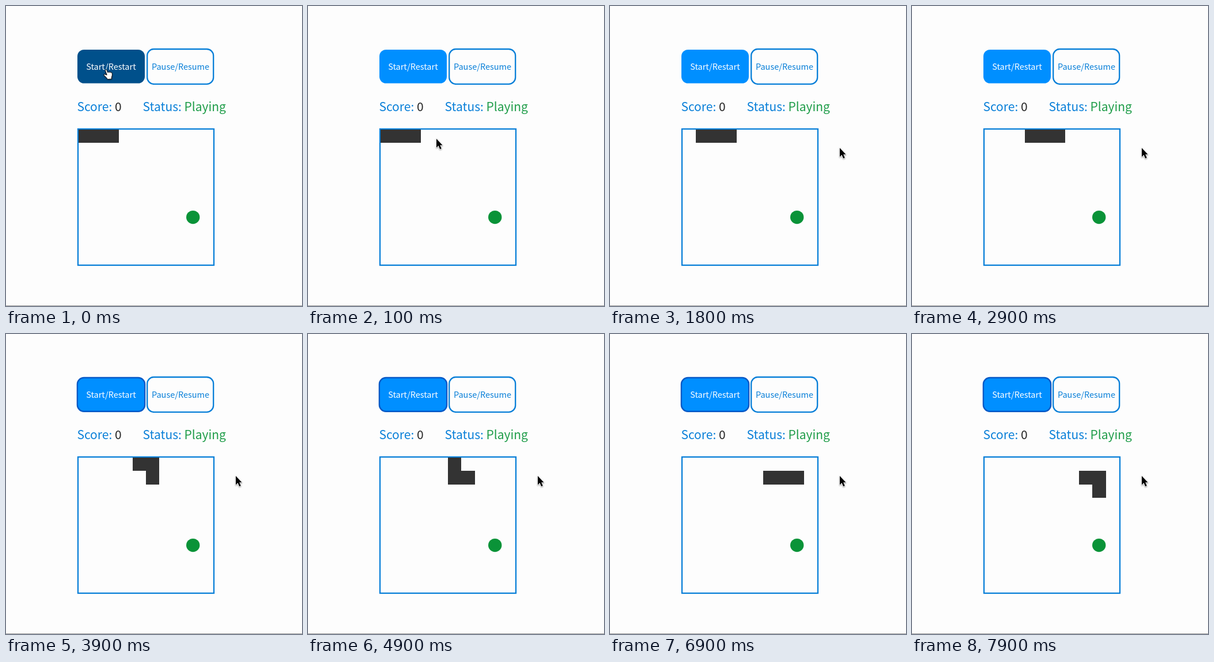
These frames come from a looping animation (514x522 px, 8000 ms). An HTML page:

```html
<!DOCTYPE html>
<html lang="en">
<head>
<meta charset="utf-8">
<title>Snake</title>
<style>
  html, body { margin: 0; width: 100%; height: 100%; overflow: hidden; background: #fdfdfd; }
  svg { display: block; width: 514px; height: 522px; }
  text {
    font-family: "Noto Sans CJK JP", "Noto Sans CJK SC", "Noto Sans CJK", "Open Sans", sans-serif;
    font-size: 21px;
    fill: #087fd8;
  }
  .label { font-size: 14.5px; text-anchor: middle; }
  .frame { fill: none; stroke: #087fd8; stroke-width: 2.3; }
  .pointer { stroke-linejoin: round; filter: drop-shadow(0 1px 1px #0006); }
</style>
</head>
<body>
<svg viewBox="0 0 514 522">
  <rect y="521" width="514" height="1" fill="#999"/>

  <rect id="start" x="124" y="76" width="117" height="58.6" rx="11.5"/>
  <rect id="focus" x="123.9" y="76" width="117.2" height="58.8" rx="11.5"
        fill="none" stroke="#0759c6" stroke-width="2.4"/>
  <text class="label" x="182.4" y="111" style="fill:#fff">Start/Restart</text>
  <rect class="frame" x="245.2" y="75" width="115" height="60.8" rx="11.5"/>
  <text class="label" x="303" y="111">Pause/Resume</text>

  <text x="123.4" y="183">Score: <tspan fill="#222">0</tspan></text>
  <text x="237.6" y="183">Status: <tspan fill="#1f9d49">Playing</tspan></text>

  <rect class="frame" x="125" y="214" width="236" height="237"/>
  <g id="snake" fill="#333" shape-rendering="crispEdges"></g>
  <circle cx="324.7" cy="367.6" r="11.7" fill="#0a9338"/>

  <path id="hand" class="pointer" transform="translate(168 109.5)" fill="#fff" stroke="#000"
        d="M7.2 10.6L4.6 3.2C4 1.2 6.3.4 7.1 2.3L8.8 6.3C9.6 5 11 5.2 11.4 6C12.4 5.1 13.6 5.4 14 6.4C15 6 16 6.4 16.2 7.6C16.6 10 16.4 12 15.4 14.2V17.5L8.6 18C7 15.6 4.4 13.2 2.4 11.2C1.2 9.8 2.6 8.6 4 9.4Z"/>
  <path id="arrow" class="pointer" fill="#000" stroke="#fff" stroke-width="1.6" paint-order="stroke"
        d="M0 0V15.4L3.5 12.1L6.2 18.2L8.8 17L6.2 11.2H10.6Z"/>
</svg>
<script>
  const LOOP = 8000, CELL = 23.4, LEFT = 126, TOP = 215, LENGTH = 3;
  const trail = [[0, 0], [1, 0], [2, 0], [3, 0], [4, 0], [5, 0],
                 [5, 1], [6, 1], [7, 1], [8, 1], [8, 2]];
  const arrowStops = [[223, 231], [350, 245], [399, 247]];
  const el = id => document.getElementById(id);
  const show = (id, on) => el(id).setAttribute("visibility", on ? "visible" : "hidden");

  const cells = Array.from({ length: LENGTH }, () => {
    const cell = document.createElementNS("http://www.w3.org/2000/svg", "rect");
    cell.setAttribute("width", CELL);
    cell.setAttribute("height", CELL);
    return el("snake").appendChild(cell);
  });

  function draw(t) {
    const step = Math.floor((t + 100) / 1000);
    cells.forEach((cell, i) => {
      const [col, row] = trail[step + i];
      cell.setAttribute("x", LEFT + col * CELL);
      cell.setAttribute("y", TOP + row * CELL);
    });

    const hover = t < 100;
    el("start").setAttribute("fill", hover ? "#00508b" : "#008fff");
    show("focus", t >= 3700);
    show("hand", hover);
    show("arrow", !hover);
    const stop = Math.min(2, Math.max(0, Math.floor(t / 100) - 1));
    el("arrow").setAttribute("transform", `translate(${arrowStops[stop]})`);
  }

  const begin = performance.now();
  function tick() {
    draw((performance.now() - begin) % LOOP);
    requestAnimationFrame(tick);
  }
  tick();
</script>
</body>
</html>
```
